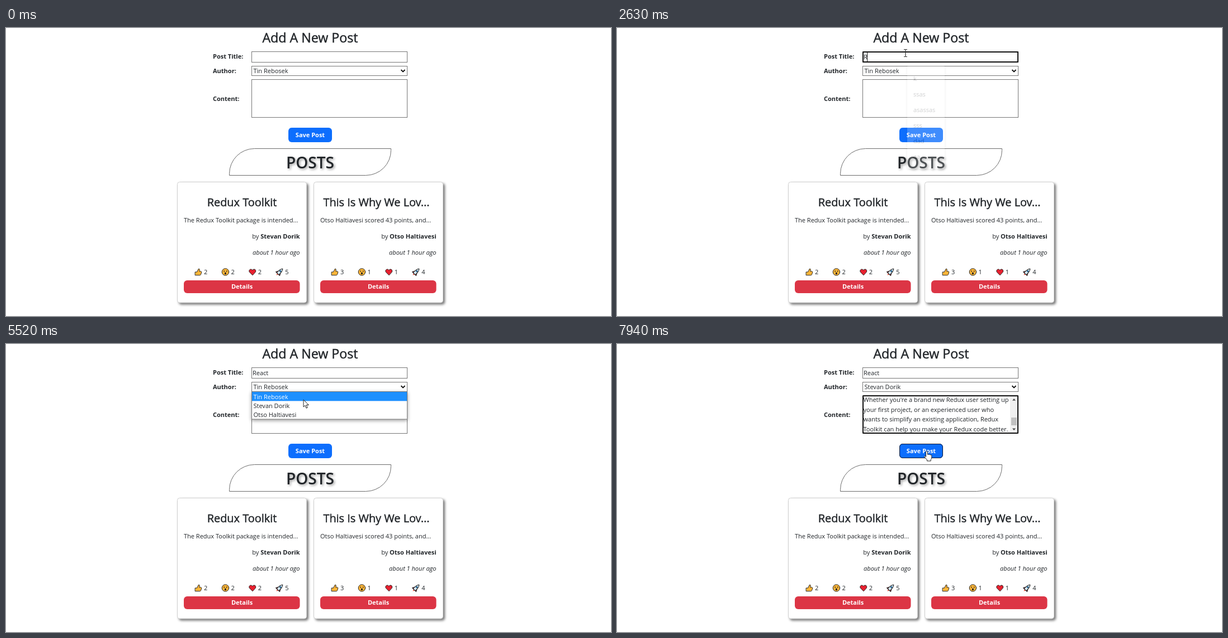
An HTML page that plays this animation: 1082 by 517 pixels, repeating every 8000 ms.

```html
<!DOCTYPE html>
<html lang="en">
<head>
<meta charset="utf-8">
<title>Add a new post</title>
<style>
  html, body { margin: 0; width: 100%; height: 100%; overflow: hidden; background: #fff; }
  svg { display: block; width: 100%; height: 100%; }
  text { font: 11px "Open Sans", "Noto Sans", sans-serif; fill: #212529; white-space: pre; }
  .bold { font-weight: 700; }
  .italic { font-style: italic; }
  .light { fill: #fff; }
  .mid { text-anchor: middle; }
  .end { text-anchor: end; }
  .h2, .h3 { stroke: #212529; stroke-width: .45; }
  .h2 { font-size: 23.2px; }
  .h3 { font-size: 19.9px; }
  .h1 { font-size: 28px; font-weight: 600; filter: drop-shadow(2px 2px 2px #0006); }
  .field { fill: #fff; stroke: #767676; }
  .ring { fill: none; stroke: #101010; stroke-width: 2; }
  .card { fill: #fff; stroke: #cfcfcf; filter: drop-shadow(3px 3px 2px #0008); }
  .ink { stroke: #222; stroke-linejoin: round; stroke-linecap: round; }
</style>
</head>
<body>
<svg viewBox="0 0 1082 517">
  <defs>
    <clipPath id="areaClip"><rect x="440" y="94" width="263" height="65"/></clipPath>
    <g id="thumb" class="ink" fill="#ffb638">
      <path d="M-5.5 0h3L.3-5.6q2.2-.6 1.9 1.8L1.7-1.2H4.6q1.6.3 1 2.1L4.4 4.6Q4 5.8 2.7 5.8H-5.5Z"/>
    </g>
    <g id="wow" class="ink">
      <circle r="6.2" fill="#ffb638"/>
      <g fill="#222" stroke="none">
        <circle cx="-2.3" cy="-1.4" r="1"/><circle cx="2.3" cy="-1.4" r="1"/>
        <ellipse cy="2.6" rx="1.6" ry="2"/>
      </g>
    </g>
    <path id="heart" class="ink" fill="#e8202f"
      d="M0 5.6L-5.3.2C-7.8-3-3.2-7.4 0-3.3 3.2-7.4 7.8-3 5.3.2Z"/>
    <g id="rocket" class="ink" transform="rotate(45)">
      <path d="M-2 4L0 8 2 4Z" fill="#f5533d" stroke="none"/>
      <path d="M-2.5 0L-5 4.5H5L2.5 0Z" fill="#e8303a"/>
      <path d="M0-8Q3.4-4 2.5 4.5H-2.5Q-3.4-4 0-8Z" fill="#d5ecfb"/>
      <circle cy="-2" r="1.4" fill="#1c8fe8" stroke-width=".6"/>
    </g>
  </defs>

  <text class="h2 mid" x="544" y="26">Add A New Post</text>
  <text class="bold" x="370" y="55">Post Title:</text>
  <text class="bold" x="370" y="81">Author:</text>
  <text class="bold" x="370" y="131">Content:</text>

  <rect id="titleBox" class="field" x="439.5" y="42.5" width="278" height="19"/>
  <rect id="titleRing" class="ring" x="440" y="43" width="277" height="18" rx="1"/>
  <text id="title" x="441" y="56"></text>

  <rect id="authorBox" class="field" x="439.5" y="68.5" width="278" height="17"/>
  <text id="author" x="442.5" y="81"></text>
  <path d="M706.5 75l3.5 3.5 3.5-3.5" fill="none" stroke="#111" stroke-width="1.9"/>

  <rect id="areaBox" class="field" x="439.5" y="92.5" width="278" height="68"/>
  <g id="content">
    <g id="lines" clip-path="url(#areaClip)"></g>
    <rect x="703" y="94" width="14" height="66" fill="#f1f1f1"/>
    <rect x="705" y="132" width="10" height="14" fill="#c1c1c1"/>
    <path d="M707 101.500l3-3.500 3 3.500zM707 151.500l3 3.500 3-3.500z" fill="#444"/>
  </g>
  <rect id="areaRing" class="ring" x="440" y="93" width="277" height="67" rx="1"/>
  <rect id="caret" width="1" fill="#111"/>

  <rect x="505" y="179" width="78" height="26" rx="6" fill="#0d6efd"/>
  <rect id="pressed" x="505.500" y="179.500" width="77" height="25" rx="5.500" fill="none" stroke="#10182c"/>
  <text class="bold light mid" x="544" y="196">Save Post</text>

  <path d="M399.500 264.500V261.500A45 45 0 0 1 444.500 216.500H688.500V219.500A45 45 0 0 1 643.500 264.500Z"
    fill="#fff" stroke="#6b6b6b"/>
  <text class="h1 mid" x="544" y="252">POSTS</text>
  <g id="cards"></g>

  <g id="history">
    <rect x="519" y="67" width="67" height="186" rx="3" fill="#fff" style="filter:drop-shadow(0 1px 2px #0006)"/>
  </g>

  <g id="options">
    <rect x="439.500" y="85.500" width="278" height="49.500" class="field" style="filter:drop-shadow(0 2px 3px #0006)"/>
    <rect id="highlight" x="440" width="277" height="16.300" fill="#1e90ff"/>
  </g>

  <g id="cursor">
    <path id="beam" d="M-3-6.500h2.200L0-6 .8-6.500H3M0-6V6M-3 6.500h2.200L0 6l.8.5H3" fill="none" stroke="#333" stroke-width="1.200"/>
    <path id="arrow" d="M0 0V13l3-2.800 2 5 2.200-1-2-4.700H9.300Z" fill="#fff" stroke="#222"/>
    <path id="hand" d="M-1.500 1Q0-1 1.500 1V6.500Q3 5 4.200 6.700 5.500 5.500 6.700 7.200 8.500 6.500 8.800 8.500V12Q8.800 14 7.200 15.500V18H.5V16L-4.500 10.500Q-4.500 8-1.500 10.500Z"
      fill="#fff" stroke="#222"/>
  </g>
</svg>

<script>
const $ = id => document.getElementById(id);
const show = (id, on) => $(id).style.display = on ? '' : 'none';
const add = (id, markup) => $(id).insertAdjacentHTML('beforeend', markup);
const label = (x, y, str, cls = '') => `<text x="${x}" y="${y}" class="${cls}">${str}</text>`;

const LOOP = 8000;
const people = ['Tin Rebosek', 'Stevan Dorik', 'Otso Haltiavesi'];
const icons = ['thumb', 'wow', 'heart', 'rocket'];

function card(x, heading, headingX, body, person, counts) {
  const reactions = icons.map((icon, i) => {
    const cx = 38 + i * 48.4;
    return `<g transform="translate(${cx} 162)"><use href="#${icon}"/></g>` + label(cx + 10, 166, counts[i]);
  }).join('');
  add('cards', `<g transform="translate(${x} 276)">
    <rect class="card" x=".5" y=".5" width="231" height="216.500" rx="4"/>
    ${label(headingX, 44, heading, 'h3 mid')}
    ${label(12, 73, body)}
    ${label(219.5, 102, `by <tspan class="bold">${person}</tspan>`, 'end')}
    ${label(219.5, 131, 'about 1 hour ago', 'italic end')}
    ${reactions}
    <rect x="12" y="177" width="207.500" height="23" rx="6" fill="#dc3545"/>
    ${label(116, 192, 'Details', 'bold light mid')}
  </g>`);
}
card(306, 'Redux Toolkit', 116, 'The Redux Toolkit package is intended...', people[1], [2, 2, 2, 5]);
card(550, 'This Is Why We Lov...', 112.5, `${people[2]} scored 43 points, and...`, people[2], [3, 1, 1, 4]);

["Whether you're a brand new Redux user setting up",
 'your first project, or an experienced user who',
 'wants to simplify an existing application, Redux',
 'Toolkit can help you make your Redux code better.'
].forEach((line, i) => add('lines', label(440.5, 104 + i * 17.6, line)));

['k', 'ssas', 'asassas', 'sss', 'dad', 'aa']
  .forEach((word, i) => add('history', label(530, 95 + i * 28, word)));

people.forEach((name, i) => add('options', label(442.5, 98.5 + i * 16.2, name)));
const optionTexts = document.querySelectorAll('#options text');

// Pointer moves: start, end, steps, target x, target y
const moves = [
  [190, 950, 11, 510, 40], [1020, 1020, 1, 510, 41], [1550, 1690, 3, 512, 45],
  [1830, 1890, 2, 514, 44.5], [2090, 2090, 1, 516, 45], [4600, 4790, 4, 523, 75],
  [5260, 5520, 4, 532, 100], [5590, 5590, 1, 532, 103], [5860, 5860, 1, 533, 103],
  [7670, 7940, 5, 554, 192]
];

function pointerAt(t) {
  let x = 800, y = 360;
  for (const [start, end, steps, toX, toY] of moves) {
    if (t < start) break;
    const gap = (end - start) / (steps - 1) || 1;
    const p = Math.min(1, (Math.floor((t - start) / gap + 0.01) + 1) / steps);
    const eased = p * (2 - p);
    x += (toX - x) * eased;
    y += (toY - y) * eased;
  }
  return { x, y };
}

const keyTimes = [2360, 3380, 3510, 3780, 3910];
const between = (t, a, b) => t >= a && t < b;

function drawPointer(t, open) {
  const { x, y } = pointerAt(t);
  const within = (top, bottom, left = 439, right = 718) =>
    !open && between(x, left, right) && between(y, top, bottom);
  const hover = { titleBox: within(42, 62), authorBox: within(68, 86), areaBox: within(92, 161) };
  for (const id in hover) $(id).style.stroke = hover[id] ? '#4f4f4f' : '#767676';

  const kind = within(179, 205, 505, 583) ? 'hand'
    : within(39, 62) || hover.areaBox ? 'beam' : 'arrow';
  for (const id of ['beam', 'arrow', 'hand']) show(id, id === kind);
  show('cursor', t >= 190);
  $('cursor').setAttribute('transform', `translate(${Math.round(x)} ${Math.round(y)})`);
}

function drawCaret(t) {
  const inTitle = between(t, 1690, 3030) || between(t, 3380, 4460);
  const inArea = between(t, 7190, 7740);
  show('caret', inTitle || inArea);
  const x = inArea ? 700 : Math.round(441 + $('title').getComputedTextLength()) - 1;
  $('caret').setAttribute('x', Math.max(441, x));
  $('caret').setAttribute('y', inArea ? 146 : 44);
  $('caret').setAttribute('height', inArea ? 13 : 16);
}

function draw(t) {
  const open = between(t, 5060, 6120);
  const picked = t >= 5590 ? 1 : 0;
  $('title').textContent = 'React'.slice(0, keyTimes.filter(k => t >= k).length);
  $('author').textContent = people[t >= 6120 ? 1 : 0];
  show('titleRing', between(t, 1690, 4990));
  show('areaRing', t >= 6460);
  show('content', t >= 7190);
  show('pressed', t >= 7940);

  show('options', open);
  $('highlight').setAttribute('y', 86 + picked * 16.2);
  optionTexts.forEach((el, i) => el.classList.toggle('light', i === picked));

  const fade = Math.max(0, Math.min(1, (2700 - t) / 340));
  $('history').style.opacity = t < 1830 ? 0 : t < 1890 ? 0.5 : fade;

  drawCaret(t);
  drawPointer(t, open);
}

function tick() {
  draw(performance.now() % LOOP);
  requestAnimationFrame(tick);
}
tick();
</script>
</body>
</html>
```
